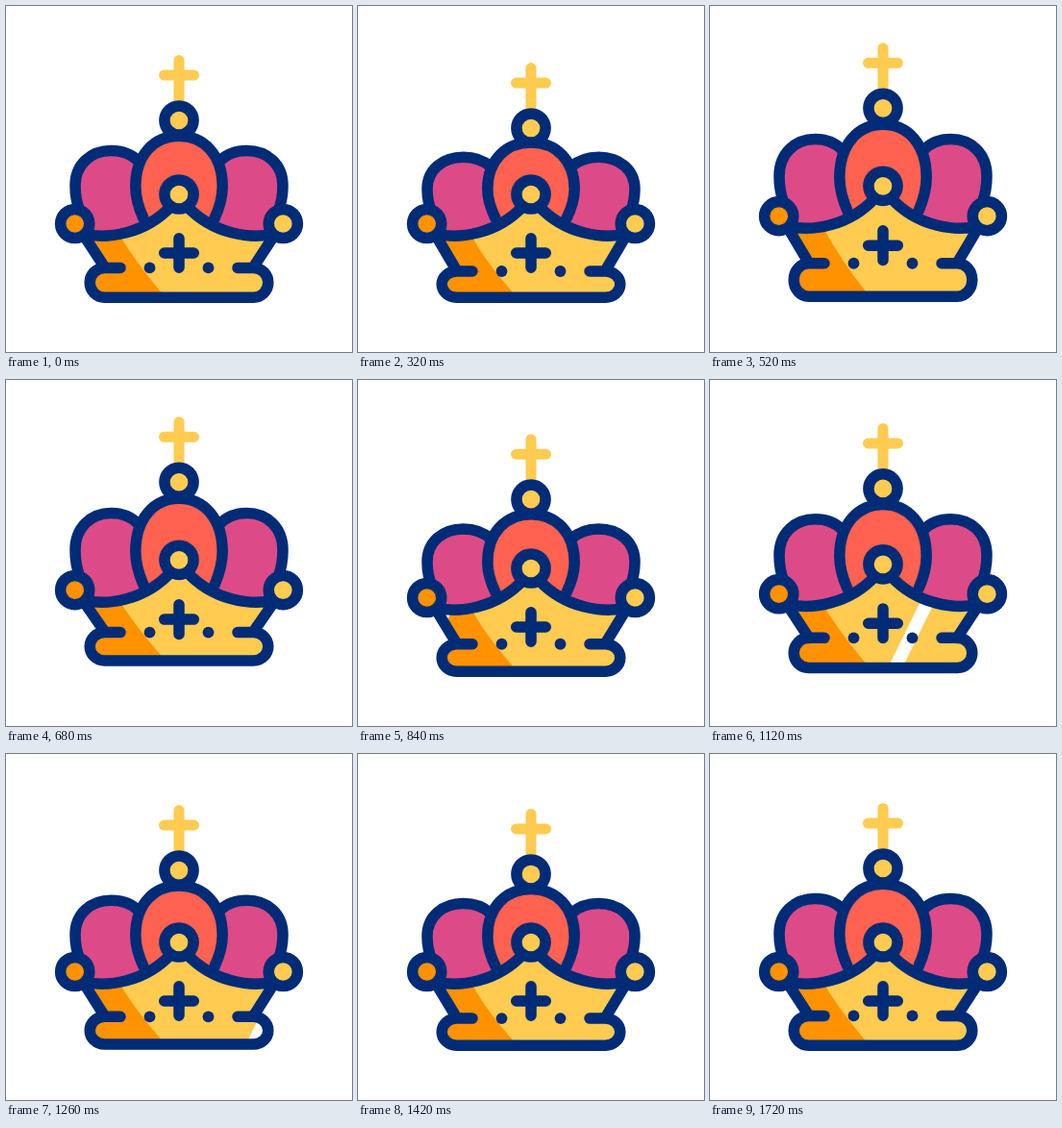
An HTML page that plays this animation: 360x360 px, repeating every 2400 ms.

```html
<!DOCTYPE html>
<html lang="en">
<head>
<meta charset="utf-8">
<title>Crown</title>
<style>
html, body { margin: 0; width: 100%; height: 100%; overflow: hidden; background: #fff; }
svg { display: block; width: 100vw; height: 100vh; }
.line { fill: none; stroke: #002b76; stroke-width: 11.5; stroke-linecap: round; stroke-linejoin: round; }
.gold { fill: none; stroke: #ffcb50; stroke-width: 11; stroke-linecap: round; }
</style>
</head>
<body>
<svg viewBox="0 0 360 360">
  <defs><clipPath id="clip"><path id="clipShape"/></clipPath></defs>
  <path id="topCross" class="gold"/>
  <path id="leftFill" fill="#dc4b87"/>
  <path id="rightFill" fill="#dc4b87"/>
  <path id="leftDome" class="line"/>
  <path id="rightDome" class="line"/>
  <path id="midFill" fill="#ff6250"/>
  <path id="midDome" class="line"/>
  <path id="base" fill="#ffcb50"/>
  <g clip-path="url(#clip)">
    <path id="shade" fill="#ff9200"/>
    <path id="shine" fill="#fff"/>
  </g>
  <path id="outline" class="line"/>
  <path id="beltCross" class="line"/>
  <g fill="#002b76">
    <circle id="dotL" cx="149.5" r="5.9"/>
    <circle id="dotR" cx="210.5" r="5.9"/>
  </g>
  <g class="line">
    <circle id="ballL" cx="71.7" r="15.1" style="fill:#ff9200"/>
    <circle id="ballR" cx="288.3" r="15.1" style="fill:#ffcb50"/>
    <circle id="ballM" cx="180" r="15.1" style="fill:#ffcb50"/>
    <circle id="ballT" cx="180" r="15.1" style="fill:#ffcb50"/>
  </g>
</svg>
<script>
const LOOP = 2400;
const $ = id => document.getElementById(id);
const path = (id, d) => $(id).setAttribute('d', d);
const setY = (id, y) => $(id).setAttribute('cy', y);

// Damped bounce of the crown's tip: [time, offset], down is positive
const bounce = [[160, 0], [370, 9.2], [590, -19], [860, 5.5], [1090, -6.5], [1370, 6.3], [1720, 0]];

function tip(t) {
  const i = bounce.findIndex(k => k[0] > t);
  if (i < 1) return 0;
  const [t0, a] = bounce[i - 1], [t1, b] = bounce[i];
  return a + (b - a) * (1 - Math.cos(Math.PI * (t - t0) / (t1 - t0))) / 2;
}
// The body only leaves the ground on the upward swing
const lift = t => .62 * Math.min(0, tip(t));

// Builds a path from commands and x,y pairs, optionally mirrored about the middle
function draw(parts, flip) {
  let isX = true;
  return parts.map(p => {
    if (typeof p === 'string') return p;
    const n = isX && flip ? 360 - p : p;
    isX = !isX;
    return n.toFixed(2);
  }).join(' ');
}

function render(t) {
  const h = tip(t), up = lift(t), squash = Math.max(0, h);
  const side = 226.5 + up, mid = 196 + up * 1.1, belt = 257 + up;
  // The lower parts follow the lift a little later
  const bar = 272.4 + lift(t - 28) + squash * .45;
  const bottom = 303.2 + lift(t - 57);

  path('topCross', `M180 ${56.5 + h}V${101 + h}M164.5 ${72 + h}H195.5`);

  // Domes stretch between their tops and the belt
  const crest = up + (h - up) * .85;
  const stretch = (top, foot) => y => y + crest + (up - crest) * (y - top) / (foot - top);
  const d = stretch(150.5, 226);
  const arch = ['M', 77, d(214), 'C', 73, d(204), 72, d(195), 72, d(187),
    'C', 72, d(165), 88, d(150.5), 109.5, d(150.5), 'C', 122, d(150.5), 131, d(154.5), 138, d(161.5)];
  const archFill = [...arch, 'L', 150, side + 4.5, 'L', 80, side + 12.5, 'Z'];
  for (const [name, flip] of [['left', false], ['right', true]]) {
    path(name + 'Dome', draw(arch, flip));
    path(name + 'Fill', draw(archFill, flip));
  }

  const m = stretch(135.3, 219);
  const half = ['C', 138, m(210), 134.8, m(200), 134.8, m(188), 'C', 134.8, m(155), 154, m(135.3), 180, m(135.3)];
  const dome = draw(['M', 143, m(221), ...half, 'C', 206, m(135.3), 225.2, m(155), 225.2, m(188),
    'C', 225.2, m(200), 222, m(210), 217, m(221)]);
  path('midDome', dome);
  path('midFill', dome + 'Z');

  const rim = [80, side + 10.3, 'C', 105, side + 16.7, 145, side + 10.7, 172, mid + 12];
  const rimBack = ['L', 188, mid + 12, 'C', 215, side + 10.7, 255, side + 16.7, 280, side + 10.3];
  const r = (bottom - bar) / 2;
  const ends = [`H257.5A15.3 ${r} 0 0 1 257.5 ${bottom}`, `H102.5A15.3 ${r} 0 0 1 102.5 ${bar}`].join('');
  const body = draw(['M', ...rim, ...rimBack, 'L', 257, bar]) + ends + 'Z';
  path('base', body);
  path('clipShape', body);
  path('shade', `M70 ${side}L115 ${side + 6}Q131 ${bar - 10} 166 ${bottom}H70Z`);

  const strokes = ['M', ...rim, 'M', 81.5, side + 13, 'L', 103, bar];
  path('outline', draw(strokes) + draw(strokes, true) + `M241 ${bar}${ends}H119`);
  path('beltCross', `M180 ${belt - 15.3}V${belt + 15.3}M164.7 ${belt}H195.3`);

  // Glint sweeping across the base
  const x = 209 + (t - 1120) * .47;
  path('shine', `M${x + 22} 205H${x + 37}L${x - 17} 315H${x - 32}Z`);

  setY('dotL', bar);
  setY('dotR', bar);
  setY('ballL', side);
  setY('ballR', side);
  setY('ballM', mid);
  setY('ballT', 119 + h);
}

const start = performance.now();
function tick() {
  render((performance.now() - start) % LOOP);
  requestAnimationFrame(tick);
}
render(0);
requestAnimationFrame(tick);
</script>
</body>
</html>
```
